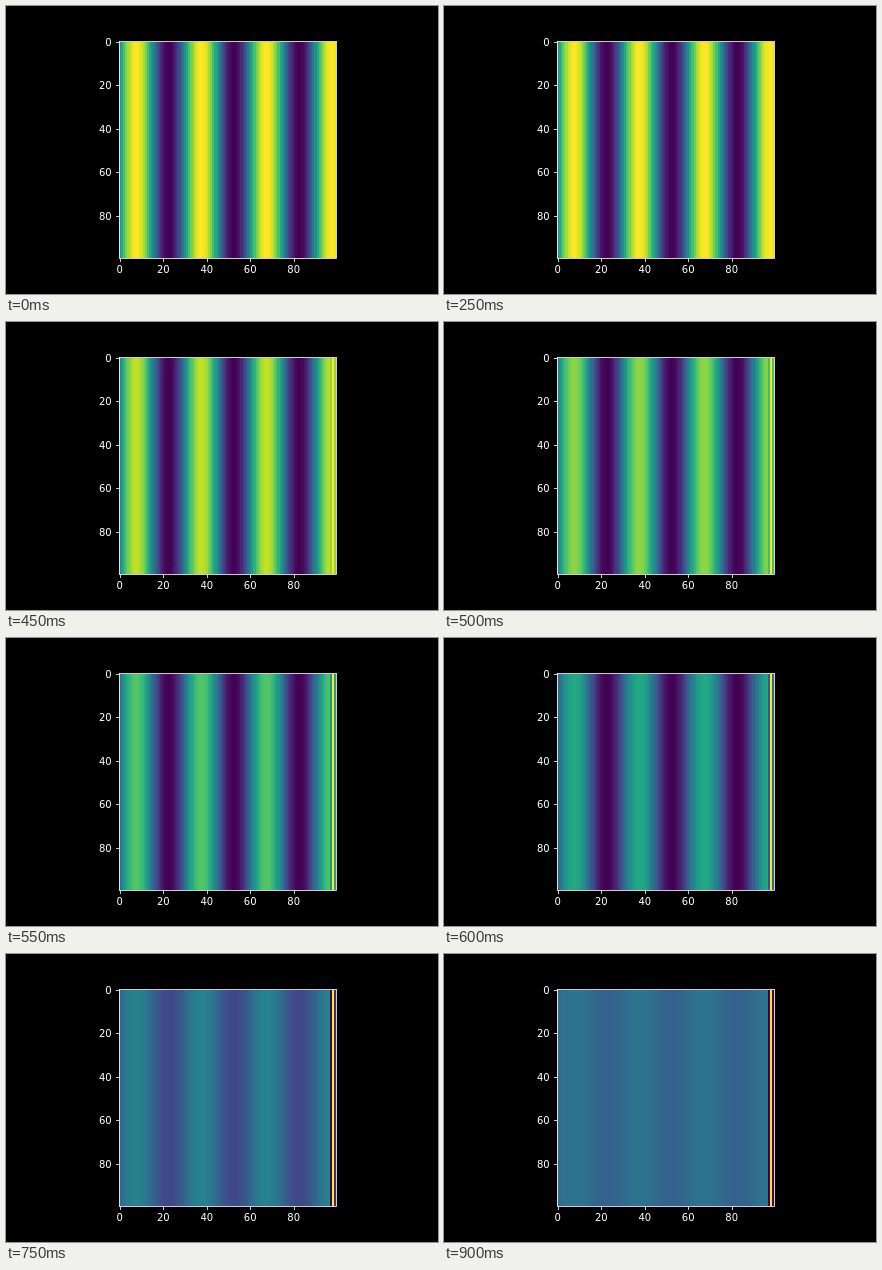
These frames come from a looping animation (432 px wide and 288 px high, 1 s). An HTML page:

```html
<!DOCTYPE html>
<html lang="en">
<head>
<meta charset="utf-8">
<title>Growing edge instability</title>
<style>
  html, body { margin: 0; width: 100%; height: 100%; overflow: hidden; background: #000; }
  svg { display: block; width: 432px; height: 288px; }
  text { font: 10px "DejaVu Sans", sans-serif; fill: #fff; }
</style>
</head>
<body>
<svg id="stage" viewBox="0 0 432 288">
  <rect width="432" height="288" fill="#000"/>
  <g id="cells" shape-rendering="crispEdges"></g>
  <g id="axes"></g>
</svg>
<script>
const COLS = 100, LEFT = 112.68, TOP = 34.56, CELL = 2.1744;
const LOOP = 1000, STEP = 50, LAST = 18;
const VIRIDIS = ["440154", "482475", "414487", "355f8d", "2a788e", "21918c",
                 "22a884", "44bf70", "7ad151", "bddf26", "fde725"]
  .map(h => [0, 2, 4].map(i => parseInt(h.slice(i, i + 2), 16)));

// [step, size of the disturbance], growing exponentially between points
const GROWTH = [[5, 0.01], [8, 0.1], [10, 0.41], [12, 1.33], [15, 4.8], [18, 17]];

function add(parent, tag, attrs, label) {
  const el = document.createElementNS("http://www.w3.org/2000/svg", tag);
  for (const name in attrs) el.setAttribute(name, attrs[name]);
  if (label !== undefined) el.textContent = label;
  return parent.appendChild(el);
}

const cellGroup = document.getElementById("cells");
const axes = document.getElementById("axes");

const cells = Array.from({ length: COLS }, (_, i) => {
  const x = Math.round(LEFT + i * CELL);
  const end = Math.round(LEFT + (i + 1) * CELL);
  return add(cellGroup, "rect", { x, y: 36, width: end - x, height: 216 });
});

function line(x1, y1, x2, y2) {
  add(axes, "line", { x1, y1, x2, y2, stroke: "#fff", "stroke-width": 0.8 });
}

add(axes, "rect", { x: 113.5, y: 35.5, width: 217, height: 217,
                    fill: "none", stroke: "#fff", "stroke-width": 0.8 });
for (let v = 0; v < COLS; v += 20) {
  const offset = (v + 0.5) * CELL;
  const x = Math.round(LEFT + offset) + 0.5;
  const y = Math.round(TOP + offset) + 0.5;
  line(x, 252.5, x, 256);
  line(110, y, 113.5, y);
  add(axes, "text", { x: LEFT + offset, y: 267, "text-anchor": "middle" }, v);
  add(axes, "text", { x: 105.7, y: y + 3.5, "text-anchor": "end" }, v);
}

function viridis(t) {
  const p = Math.min(1, Math.max(0, t)) * (VIRIDIS.length - 1);
  const i = Math.min(Math.floor(p), VIRIDIS.length - 2);
  const rgb = VIRIDIS[i].map((c, n) => Math.round(c + (VIRIDIS[i + 1][n] - c) * (p - i)));
  return `rgb(${rgb})`;
}

function disturbance(step) {
  if (step < GROWTH[0][0]) return 0;
  const n = GROWTH.findIndex(([s]) => step <= s);
  if (n === 0) return GROWTH[0][1];
  const [s0, a0] = GROWTH[n - 1], [s1, a1] = GROWTH[n];
  return a0 * (a1 / a0) ** ((step - s0) / (s1 - s0));
}

function render(time) {
  const step = Math.min(LAST, Math.floor((time % LOOP) / STEP));
  const size = disturbance(step);
  const wave = cells.map((_, i) => Math.sin(i * Math.PI / 15));
  wave[97] -= size * (step > 15 ? 0.8 - (step - 15) * 0.06 : 0.8);
  wave[98] += size;
  wave[99] -= size * 0.6;
  const low = Math.min(...wave), high = Math.max(...wave);
  cells.forEach((cell, i) => cell.setAttribute("fill", viridis((wave[i] - low) / (high - low))));
}

const start = performance.now();
function tick() {
  render(performance.now() - start);
  requestAnimationFrame(tick);
}
tick();
</script>
</body>
</html>
```
